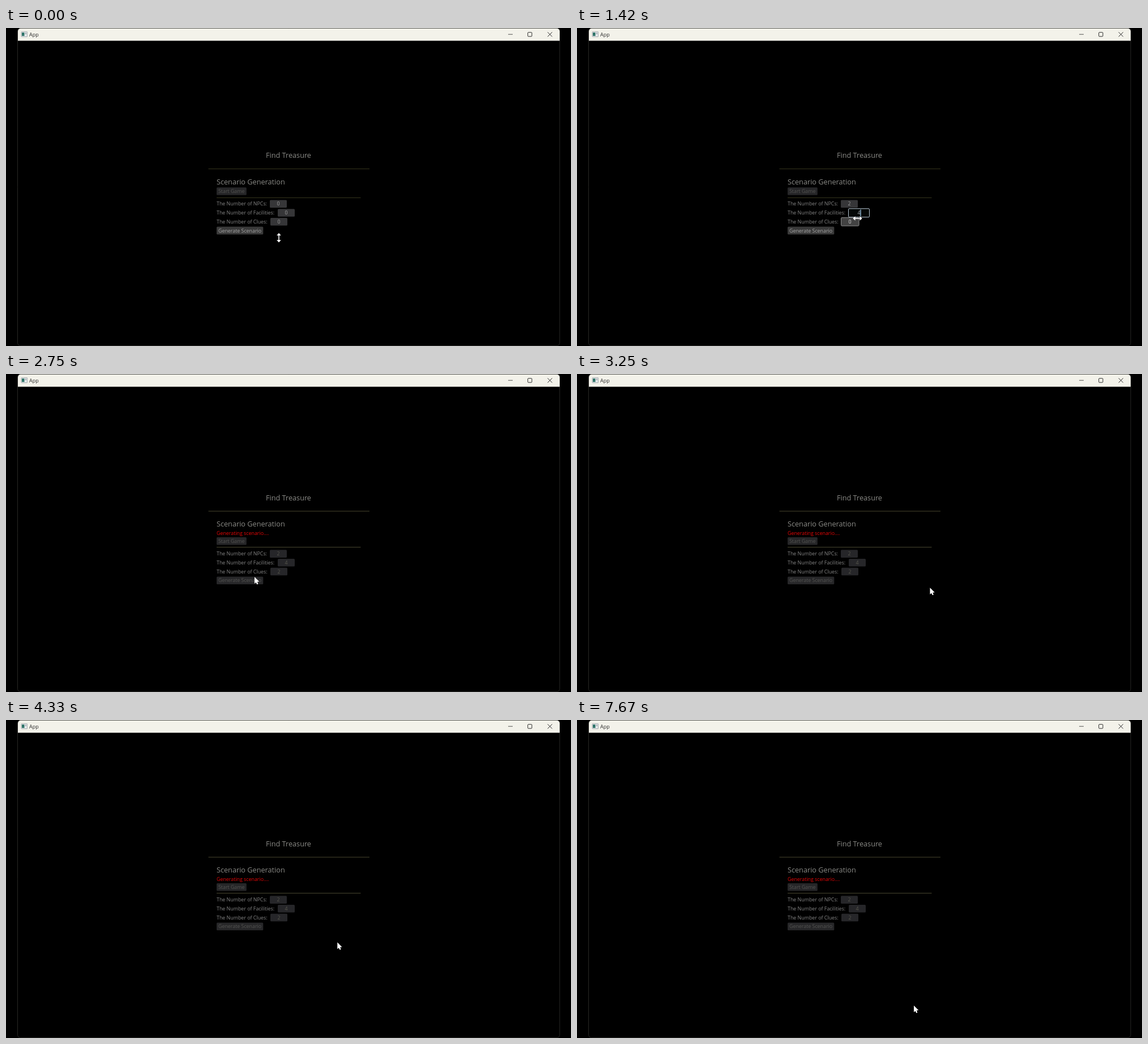
Recreate the animation shown at these times as an HTML page with a canvas. Size 998x561 px, loop 8000 ms.

```html
<!DOCTYPE html>
<html lang="en">
<head>
<meta charset="utf-8">
<title>App</title>
<style>
html, body { margin: 0; width: 100%; height: 100%; overflow: hidden; background: #000; }
canvas { display: block; width: 998px; height: 561px; }
</style>
</head>
<body>
<canvas id="stage" width="998" height="561"></canvas>
<script>
const ctx = document.getElementById('stage').getContext('2d');
const LOOP = 8000, STEP = 1000 / 12;
const FONT = '"Open Sans", "Noto Sans", sans-serif';
const BODY = 8.85, HEAD = 12.7;
const SUBMIT = 33; // step at which generation begins

// Pointer path: step, x, y, shape
const PATH = [
  [0, 482, 370, 'v'], [1, 483, 362, 'a'], [2, 484, 346, 'h'], [4, 478, 313, 'h'],
  [6, 474, 311, 'i'], [9, 474, 312, 'i'], [10, 474, 312, 'i'],
  [11, 480, 318, 'h'], [13, 495, 326, 'h'], [14, 496, 327, 'i'], [16, 496, 329, 'i'],
  [17, 495.5, 336, 'h'], [19, 484, 342, 'h'], [20, 484, 342, 'i'], [23, 484, 344, 'i'],
  [24, 484, 354, 'a'], [27, 486, 392, 'a'], [28, 478, 385, 'a'], [30, 439, 358, 'a'],
  [33, 439, 358, 'a'], [37, 623.5, 377, 'a'], [41, 623.5, 377, 'a'], [50, 585.3, 392.3, 'a'],
  [52, 585.3, 392.3, 'a'], [54, 558, 386, 'a'], [55, 558, 386, 'a'], [56, 573, 386, 'a'],
  [57, 588, 387, 'v'], [71, 588, 387, 'v'], [72, 593, 499, 'a'], [73, 593, 499, 'a'],
  [74, 595, 503.7, 'a'], [96, 595, 503.7, 'a']
];

// focus, typed and blur are steps
const FIELDS = [
  { label: 'The Number of NPCs:', x: 466, y: 310.3, value: 2, focus: 6, typed: 8, blur: 14 },
  { label: 'The Number of Facilities:', x: 480, y: 326, value: 4, focus: 14, typed: 16, blur: 20 },
  { label: 'The Number of Clues:', x: 467, y: 341.7, value: 2, focus: 20, typed: 22, blur: 25 }
];

function pointerAt(k) {
  let i = 0;
  while (i < PATH.length - 2 && PATH[i + 1][0] <= k) i++;
  const [k0, x0, y0, shape] = PATH[i], [k1, x1, y1] = PATH[i + 1];
  const u = (k - k0) / (k1 - k0);
  return { x: x0 + (x1 - x0) * u, y: y0 + (y1 - y0) * u, shape };
}

function text(str, x, y, color, size = BODY, align = 'left') {
  ctx.font = `${size}px ${FONT}`;
  ctx.textAlign = align;
  ctx.fillStyle = color;
  ctx.fillText(str, x, y);
}

function box(x, y, w, h, fill, stroke, r = 1.5) {
  ctx.beginPath();
  ctx.roundRect(x, y, w, h, r);
  ctx.fillStyle = fill;
  ctx.fill();
  if (stroke) {
    ctx.strokeStyle = stroke;
    ctx.lineWidth = 1;
    ctx.stroke();
  }
}

function line(x0, y0, x1, y1, color, width = 1) {
  ctx.beginPath();
  ctx.moveTo(x0, y0);
  ctx.lineTo(x1, y1);
  ctx.strokeStyle = color;
  ctx.lineWidth = width;
  ctx.stroke();
}

function poly(points, fill) {
  ctx.beginPath();
  points.forEach(([x, y]) => ctx.lineTo(x, y));
  ctx.closePath();
  ctx.fillStyle = fill;
  ctx.fill();
}

const inside = (p, x, y, w, h) => p.x >= x && p.x <= x + w && p.y >= y && p.y <= y + h;

function drawWindow() {
  ctx.fillStyle = '#000';
  ctx.fillRect(0, 0, 998, 561);
  ctx.beginPath();
  ctx.roundRect(20.5, 0.5, 957.5, 560, 5);
  ctx.strokeStyle = '#272724';
  ctx.lineWidth = 1;
  ctx.stroke();
  box(21, 0.7, 957, 21.8, '#f3f2ea', null, [5, 5, 0, 0]);

  box(27, 6.5, 10.5, 9, '#e4e8ea', '#a9adb0', 0.5);
  ctx.fillStyle = '#2f7468';
  ctx.fillRect(28, 8, 4.5, 6);
  ctx.fillStyle = '#777d83';
  ctx.fillRect(34.5, 8, 1, 3);
  text('App', 41, 14.7, '#2c2c2c', 9);

  const ink = '#2a2a2a';
  line(887, 11.2, 895, 11.2, ink, 0.8);
  ctx.beginPath();
  ctx.roundRect(921.7, 7.7, 7.2, 7.2, 1);
  ctx.lineWidth = 1;
  ctx.stroke();
  line(956.7, 7.3, 964.7, 15.3, ink);
  line(964.7, 7.3, 956.7, 15.3, ink);
}

function drawField(f, k, p, busy) {
  const y = f.y + (busy ? 6.8 : 0), top = y - 6.8;
  const value = k >= f.typed ? f.value : 0;
  text(f.label, 372, y + 3.1, '#858585');
  if (k >= f.focus && k < f.blur) {
    box(f.x - 0.5, top - 0.5, 37, 15, '#050807', '#b7c5d2');
    if (k < f.typed) {
      ctx.fillStyle = '#075a7c';
      ctx.fillRect(f.x + 15, top + 1.5, 6, 11);
    }
    text(value, f.x + 18, y + 3.1, '#9aa0a6', BODY, 'center');
    line(f.x + 21, top + 1, f.x + 21, top + 13, '#9cc6e6', 1.3);
    return;
  }
  const hot = !busy && inside(p, f.x, top, 30, 13.6);
  if (hot) box(f.x - 0.5, top - 0.5, 31.5, 14.7, '#434343', '#8d8d8d');
  else box(f.x, top, 30, 13.6, busy ? '#262629' : '#363638');
  text(value, f.x + 15, y + 3.1, busy ? '#56564c' : hot ? '#dcdcdc' : '#9e9e9e', BODY, 'center');
}

function drawForm(k, p) {
  const busy = k >= SUBMIT;
  const up = busy ? -6.5 : 0, down = busy ? 6.8 : 0;
  const rule = busy ? '#48462f' : '#35341c';
  text('Find Treasure', 499, 229 + up, '#8a8a86', HEAD, 'center');
  line(357.5, 248.5 + up, 642, 248.5 + up, rule);
  text('Scenario Generation', 372, 275.5 + up, '#8a8a86', HEAD);
  if (busy) text('Generating scenario....', 372, 283.5, '#e80606');

  box(372, 281.2 + down, 52.8, 13.6, '#262628');
  text('Start Game', 375, 291.2 + down, '#545452');
  const ruleY = busy ? 305.5 : 299.5;
  line(372, ruleY, 626.5, ruleY, rule);
  FIELDS.forEach(f => drawField(f, k, p, busy));

  const hot = !busy && inside(p, 372, 350.7, 82, 13.6);
  if (hot) box(371.5, 350.2, 83.3, 14.6, k === SUBMIT - 1 ? '#373737' : '#464646', '#a0a0a0');
  else box(372, 350.6 + down, 82.3, 13.6, busy ? '#272729' : '#3a3a3a');
  text('Generate Scenario', 375, 360.6 + down, busy ? '#545452' : hot ? '#eaeaea' : '#a8a8a8');

  if (k >= 71 && k < 74) line(357, 385.6, 642, 385.6, '#dedede', 1.2);
}

function drawPointer({ x, y, shape }) {
  const white = '#fff';
  ctx.save();
  ctx.translate(x, y);
  if (shape === 'a') {
    poly([[0, 0], [0, 11.8], [2.6, 9.6], [4.4, 13.2], [6.4, 12.3], [4.8, 8.7], [8.2, 8.3]], white);
  } else if (shape === 'i') {
    line(0, -6, 0, 6, white);
    line(-2.5, -6, 2.5, -6, white);
    line(-2.5, 6, 2.5, 6, white);
  } else {
    if (shape === 'h') ctx.rotate(Math.PI / 2);
    line(0, -5, 0, 5, white, 1.6);
    for (const s of [-1, 1]) poly([[0, 8.2 * s], [-3.8, 4 * s], [3.8, 4 * s]], white);
  }
  ctx.restore();
}

function render(now) {
  const k = Math.floor(((now - start) % LOOP + 4) / STEP);
  const p = pointerAt(k);
  drawWindow();
  drawForm(k, p);
  drawPointer(p);
}

const start = performance.now();
function tick() {
  render(performance.now());
  requestAnimationFrame(tick);
}
tick();
</script>
</body>
</html>
```
